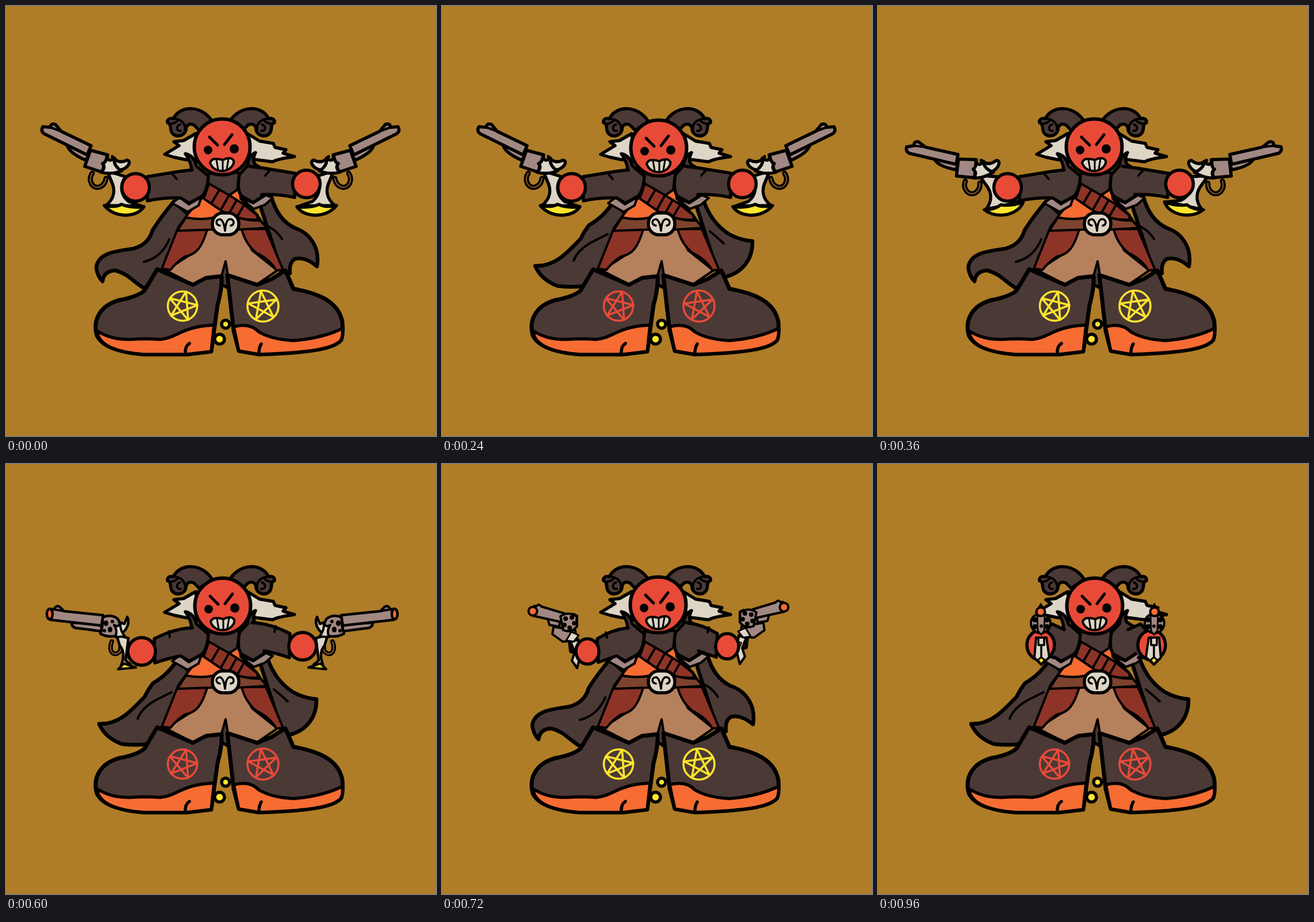
Recreate the animation shown at these times as an HTML page. Size 748 by 748 pixels, loop 1080 ms.

```html
<!DOCTYPE html>
<html lang="en">
<head>
<meta charset="utf-8">
<title>Horned gunslinger</title>
<style>
  html, body { margin: 0; width: 100%; height: 100%; overflow: hidden; background: #af7d27; }
  svg { display: block; width: 100vw; height: 100vh; }
  svg { stroke: #000; stroke-width: 5.5; stroke-linejoin: round; stroke-linecap: round; fill: none; }
  .coat { fill: #4b3936; }
  .red { fill: #e84a38; }
  .orange { fill: #f66c33; }
  .maroon { fill: #8e3427; }
  .belt { fill: #7d432e; }
  .tan { fill: #b5805c; }
  .cream { fill: #ddd5c6; }
  .yellow { fill: #fee42d; }
  .steel { fill: #a28882; }
  .ink { fill: #000; stroke: none; }
  .thin { stroke-width: 4; }
  .bold { stroke-width: 7; }

  /* body: three drawings, 120 ms each */
  .b { animation: third 360ms step-end infinite; }
  .b2 { animation-delay: -240ms; }
  .b3 { animation-delay: -120ms; }
  @keyframes third { 0% { visibility: visible } 33.333%, 100% { visibility: hidden } }

  .head { animation: nod 360ms step-end infinite; }
  @keyframes nod { 0% { transform: none } 66.666%, 100% { transform: translate(1px, 2px) } }

  .sigil { stroke-width: 3.6; animation: glow 360ms step-end infinite; }
  @keyframes glow { 0% { stroke: #fee42d } 33.333% { stroke: #f66c33 } 66.666%, 100% { stroke: #e84a38 } }

  /* arms: six poses over the whole loop */
  .p { animation: 1080ms step-end infinite; }
  .p1 { animation-name: p1 }
  .p2 { animation-name: p2 }
  .p3 { animation-name: p3 }
  .p4 { animation-name: p4 }
  .p5 { animation-name: p5 }
  .p6 { animation-name: p6 }
  @keyframes p1 { 0% { visibility: visible } 33.333%, 100% { visibility: hidden } }
  @keyframes p2 { 0% { visibility: hidden } 33.333% { visibility: visible } 55.555%, 100% { visibility: hidden } }
  @keyframes p3 { 0% { visibility: hidden } 55.555% { visibility: visible } 66.666%, 100% { visibility: hidden } }
  @keyframes p4 { 0% { visibility: hidden } 66.666% { visibility: visible } 77.777%, 100% { visibility: hidden } }
  @keyframes p5 { 0% { visibility: hidden } 77.777% { visibility: visible } 88.888%, 100% { visibility: hidden } }
  @keyframes p6 { 0% { visibility: hidden } 88.888%, 100% { visibility: visible } }
</style>
</head>
<body>
<svg viewBox="0 0 748 748">
  <defs>
    <path id="star" d="M0-26 15.3 21-24.7-8H24.7L-15.3 21Z"/>

    <g id="horn">
      <path class="coat" d="M359 201C342 173 304 171 291 196C284 194 280 198 281 203C289 205 284 214 289 221C296 230 310 226 313 216C313 208 318 203 327 207L336 216Z"/>
      <path class="thin" d="M291 196C304 196 314 205 311 217M303 206C295 208 296 219 304 217M287 205Q294 204 299 199"/>
    </g>

    <!-- revolver seen from the side -->
    <g id="side">
      <path d="M150 291C142 303 150 318 162 315Q172 312 174 300" stroke-width="9"/>
      <path d="M150 291C142 303 150 318 162 315Q172 312 174 300" stroke="#8a5a24" stroke-width="2"/>
      <path class="steel" d="M106 240Q107 254 138 268L148 257Z"/>
      <path class="steel" d="M64 210L77 211Q78 203 86 206L96 218L148 243L141 259L66 222Q60 217 64 210Z"/>
      <path class="thin" d="M77 211L96 218"/>
      <path class="cream" d="M176 287L208 297C196 314 201 330 213 340L236 348L174 347C190 334 190 318 183 304Z"/>
      <path class="yellow" d="M171 347Q190 351 201 345Q217 352 240 349Q231 363 208 364Q184 363 171 347Z"/>
      <path class="cream" d="M185 262Q195 276 211 268Q218 271 211 279Q204 286 192 286Z"/>
      <path class="steel" d="M147 251L177 259L167 289L137 279Z"/>
      <path class="cream" d="M176 259C176 270 181 270 189 265C186 274 194 283 201 287Q181 294 165 289Q174 282 168 274Q175 272 176 259Z"/>
    </g>
    <g id="low"><use href="#side" transform="translate(6 -4) rotate(-13 225 318)"/></g>

    <!-- revolver turning towards the viewer -->
    <g id="turn" stroke-width="4.5">
      <path d="M184 309C177 325 188 338 199 325L200 309" stroke-width="8"/>
      <path d="M184 309C177 325 188 338 199 325L200 309" stroke="#8a5a24" stroke-width="2"/>
      <path class="steel" d="M114 276Q114 286 128 286L166 291V279Z"/>
      <path class="steel" d="M76 252L84 253Q87 244 94 249L101 256L169 263L166 281L77 271Z"/>
      <path class="thin" d="M84 253L101 256"/>
      <ellipse class="orange" cx="76" cy="261" rx="5" ry="9"/>
      <path class="cream" d="M192 297L213 303L208 342L217 349L200 351Q209 329 198 316Z"/>
      <path class="yellow thin" d="M195 357L205 347L226 354Z"/>
      <path class="cream" d="M196 275L206 278L211 266Q216 276 208 288L199 298Z"/>
      <path class="steel" d="M168 267Q182 260 194 269Q204 283 191 299Q176 302 164 295Q169 282 168 267Z"/>
      <path class="cream thin" d="M188 280Q195 285 199 277Q198 290 207 300L190 301Q195 290 188 280Z"/>
      <g class="ink"><ellipse cx="174" cy="277" rx="4" ry="5"/><ellipse cx="181" cy="288" rx="4" ry="5"/><circle cx="185" cy="274" r="3"/><circle cx="171" cy="290" r="3"/></g>
    </g>

    <g id="near" stroke-width="4">
      <path d="M222 309L224 326L236 329" stroke-width="6"/>
      <path class="cream" d="M224 310L237 305L240 335L235 355L226 342L231 327Z"/>
      <path class="yellow" d="M232 318L237 316L237 329Z" stroke-width="2"/>
      <path class="steel" d="M184 270L187 280L204 283L206 266Z"/>
      <path class="steel" d="M160 247L165 247Q168 242 173 248L213 260L208 275L158 264Z"/>
      <circle class="orange" cx="158" cy="256" r="7.5"/>
      <path class="steel" d="M194 283L192 296L210 309L234 307L232 290Z"/>
      <path class="cream" d="M225 292L238 298L229 309L216 307Z" stroke-width="3"/>
      <path class="steel" d="M206 265Q221 255 235 266V282Q226 295 211 289Z"/>
      <path d="M229 261L235 264L234 272"/>
      <g class="ink"><circle cx="215" cy="269" r="4"/><circle cx="226" cy="267" r="4"/><circle cx="213" cy="280" r="4"/><circle cx="222" cy="285" r="4"/><circle cx="230" cy="277" r="4"/></g>
    </g>

    <g id="front" stroke-width="4">
      <path class="cream" d="M275 302H293L298 336L284 349L272 337Z"/>
      <path class="yellow" d="M278 341L284 336L290 341L284 348Z" stroke-width="3"/>
      <path d="M279 302V315H289V302M284 316V335" stroke-width="3.5"/>
      <circle class="steel" cx="283" cy="277" r="17"/>
      <path class="steel" d="M277 264H290L289 290L284 297L278 290Z" stroke-width="3"/>
      <g class="ink"><circle cx="273" cy="271" r="4.5"/><circle cx="273" cy="283" r="4.5"/><circle cx="294" cy="271" r="4.5"/><circle cx="294" cy="283" r="4.5"/><circle cx="284" cy="282" r="3"/></g>
      <path class="ink" d="M278 250L283 241L289 250Z"/>
      <circle class="orange" cx="283" cy="257" r="7.5"/>
    </g>

    <!-- sleeve and fist -->
    <g id="arm1">
      <path class="coat" d="M324 285L300 288Q275 292 245 297L246 339Q275 333 303 334"/>
      <path class="thin" d="M290 293L297 301"/>
      <circle class="red" cx="225.5" cy="315.5" r="24"/>
    </g>
    <g id="arm3">
      <path class="coat" d="M324 285Q293 286 258 304L259 346Q278 339 303 334"/>
      <path class="thin" d="M283 291L285 301"/>
      <circle class="red" cx="236" cy="326" r="24"/>
    </g>
    <g id="arm4">
      <path class="coat" d="M324 285Q296 288 270 304L272 345L303 334"/>
      <path class="thin" d="M285 293L287 302"/>
      <ellipse class="red" cx="253" cy="326" rx="20" ry="22"/>
    </g>
    <g id="arm6">
      <path class="coat" d="M324 288L302 278L290 292L296 333L306 337"/>
      <ellipse class="red" cx="283" cy="315" rx="24" ry="26"/>
    </g>
  </defs>

  <!-- coat tails -->
  <g class="coat" stroke-width="6.5">
    <g class="b">
      <path d="M292 340Q270 366 255 390Q248 415 222 422C195 426 160 428 157 455Q159 470 168 479Q170 461 190 460C211 465 222 480 240 491L275 470L320 365Z"/>
      <path d="M440 340L462 333Q473 372 502 386C532 396 546 423 541 453Q520 435 502 440Q492 447 494 465L480 465Z"/>
      <path class="thin" d="M240 445Q270 438 284 406"/>
      <path class="thin" d="M453 382Q469 388 480 405"/>
    </g>
    <g class="b b2">
      <path d="M297 338Q268 370 250 400Q237 421 214 429C192 438 168 436 159 452Q161 466 168 474Q185 470 200 476Q220 485 242 490L275 470L320 365Z"/>
      <path d="M440 340L459 335Q470 374 502 393C528 401 540 415 540 434Q534 443 530 450Q515 447 505 454L494 468L480 465Z"/>
      <path class="thin" d="M235 443Q252 424 285 402"/>
      <path class="thin" d="M455 384Q472 393 484 412"/>
    </g>
    <g class="b b3">
      <path d="M301 336Q283 366 256 381Q248 391 241 405C218 429 196 454 162 452Q172 476 201 487Q225 490 250 487L275 460L320 365Z"/>
      <path d="M440 340L455 338Q468 376 498 396Q517 407 540 409C541 443 520 464 494 471L480 465Z"/>
      <path class="thin" d="M229 443Q236 424 262 410L288 397"/>
      <path class="thin" d="M466 392Q476 400 490 413"/>
    </g>
  </g>

  <!-- hair and horns -->
  <path class="cream" d="M330 222L309 234L292 236L301 243L276 258L292 263L311 267L335 270Z"/>
  <path class="cream" d="M420 222L441 235L465 239L468 246L487 250L482 256L502 262Q472 266 464 271L425 266Z"/>
  <use href="#horn"/>
  <use href="#horn" transform="translate(748 0) scale(-1 1)"/>

  <!-- trousers, vest, belt -->
  <path class="coat" d="M372 450H390L385 490L375 484Z"/>
  <path class="tan thin" d="M350 388H410L428 425L472 460L437 484L386 468L382 444L375 469L325 484L278 460L332 425Z"/>
  <path class="maroon thin" d="M298 389H350C341 419 332 432 311 436Q297 445 286 459L271 457Z"/>
  <path class="maroon thin" d="M410 388H452L482 459L470 460Q460 441 435 429Q416 413 410 388Z"/>
  <path class="orange thin" d="M348 298L406 294L408 335L436 362L452 386H299L318 360L342 333Z"/>
  <path class="coat thin" d="M350 292L406 290L402 320L387 330L352 310Z"/>
  <path class="maroon thin" d="M353 309L388 329L412 344L437 364L438 372L412 371L376 357L344 335Z"/>
  <path class="thin" d="M371 320L358 342M388 329L374 354M401 338L388 361M414 346L402 367"/>
  <path class="belt thin" d="M313 368Q340 373 362 368H403Q425 374 442 373L454 386L404 389H356L298 391Z"/>
  <rect class="cream" x="359" y="360" width="46" height="38" rx="18"/>
  <path d="M372 382C363 381 365 370 373 371Q379 374 381 391Q382 374 388 371C397 369 399 381 391 382" stroke-width="3.6"/>

  <!-- boots -->
  <path class="coat bold" d="M263 458L325 485L348 473L375 470Q376 492 368 520L357 601L315 606H240C200 603 168 594 158 573C150 545 165 519 200 511Q230 505 241 495Z"/>
  <path class="orange" d="M160 566C175 575 190 580 215 580Q245 578 268 580C299 577 306 557 362 555L357 601L315 606H240C200 603 168 594 160 573Z"/>
  <path class="coat bold" d="M385 468L437 485L462 475L486 460L500 492C541 499 578 513 585 549Q587 569 583 581C570 597 525 603 440 606L405 600L396 565Z"/>
  <path class="orange" d="M396 558Q424 550 440 567Q462 580 500 582Q550 578 585 561Q587 571 583 581C570 597 525 603 440 606L405 600Z"/>
  <path d="M319 587Q311 592 312 605M444 588Q440 594 440 604"/>
  <circle class="yellow" cx="382" cy="553.5" r="7"/>
  <circle class="yellow" cx="371.5" cy="579.5" r="8.5"/>
  <g class="sigil">
    <circle cx="307" cy="522" r="25.5"/>
    <use href="#star" transform="translate(307 522) rotate(14)"/>
    <circle cx="447" cy="522" r="27"/>
    <use href="#star" transform="translate(447 522) rotate(-8)"/>
  </g>

  <!-- coat front -->
  <path class="steel thin" d="M289 343L302 333L318 345L340 332L335 347L316 358Z"/>
  <path class="steel thin" d="M408 334L430 343L452 329L464 334L450 346L431 353Z"/>
  <path class="coat" d="M312 257Q327 260 331 278L352 296Q350 325 339 332L319 343L301 332L304 300L323 285Q322 271 312 257Z"/>
  <path class="coat" d="M434 255Q421 261 420 278L406 293Q401 321 410 331L430 342L451 328L456 316L452 287L434 276Q427 269 434 255Z"/>

  <g class="head">
    <circle class="red" cx="376" cy="245" r="48.5" stroke-width="6"/>
    <circle class="ink" cx="351.5" cy="250.5" r="7.5"/>
    <circle class="ink" cx="397" cy="248.5" r="8"/>
    <path d="M354 228L368 242M393 224L380 241" stroke-width="5"/>
    <path class="cream thin" d="M355 273Q357 265 366 266Q372 266 377 268Q384 264 391 265Q399 268 395 276Q389 286 378 287Q361 288 355 273Z"/>
    <path d="M366 267L369 285M377 268V286M387 266L384 284" stroke-width="3"/>
  </g>

  <!-- arms and guns -->
  <g class="p p1">
    <use href="#side"/><use href="#arm1"/>
    <use href="#side" transform="translate(746 0) scale(-1 1)"/>
    <use href="#arm1" transform="translate(748 -6) scale(-1 1)"/>
  </g>
  <g class="p p2">
    <use href="#low"/><use href="#arm1"/>
    <use href="#low" transform="translate(751 0) scale(-1 1)"/>
    <use href="#arm1" transform="translate(750 -6) scale(-1 1)"/>
  </g>
  <g class="p p3">
    <use href="#turn"/><use href="#arm3"/>
    <use href="#turn" transform="translate(752 0) scale(-1 1)"/>
    <use href="#arm3" transform="translate(752 -9) scale(-1 1)"/>
  </g>
  <g class="p p4">
    <use href="#near"/><use href="#arm4"/>
    <use href="#near" transform="translate(753 -7) scale(-1 1)"/>
    <use href="#arm4" transform="translate(749 -9) scale(-1 1)"/>
  </g>
  <g class="p p5">
    <use href="#arm4" transform="translate(14 -5)"/>
    <use href="#near" transform="translate(133 -4) scale(.6 1)"/>
    <use href="#arm4" transform="translate(738 -11) scale(-1 1)"/>
    <use href="#near" transform="translate(624 -7) scale(-.6 1)"/>
  </g>
  <g class="p p6">
    <use href="#arm6"/><use href="#front"/>
    <use href="#arm6" transform="translate(759 0) scale(-1 1)"/>
    <use href="#front" transform="translate(764 0) scale(-1 1)"/>
  </g>
</svg>
</body>
</html>
```
